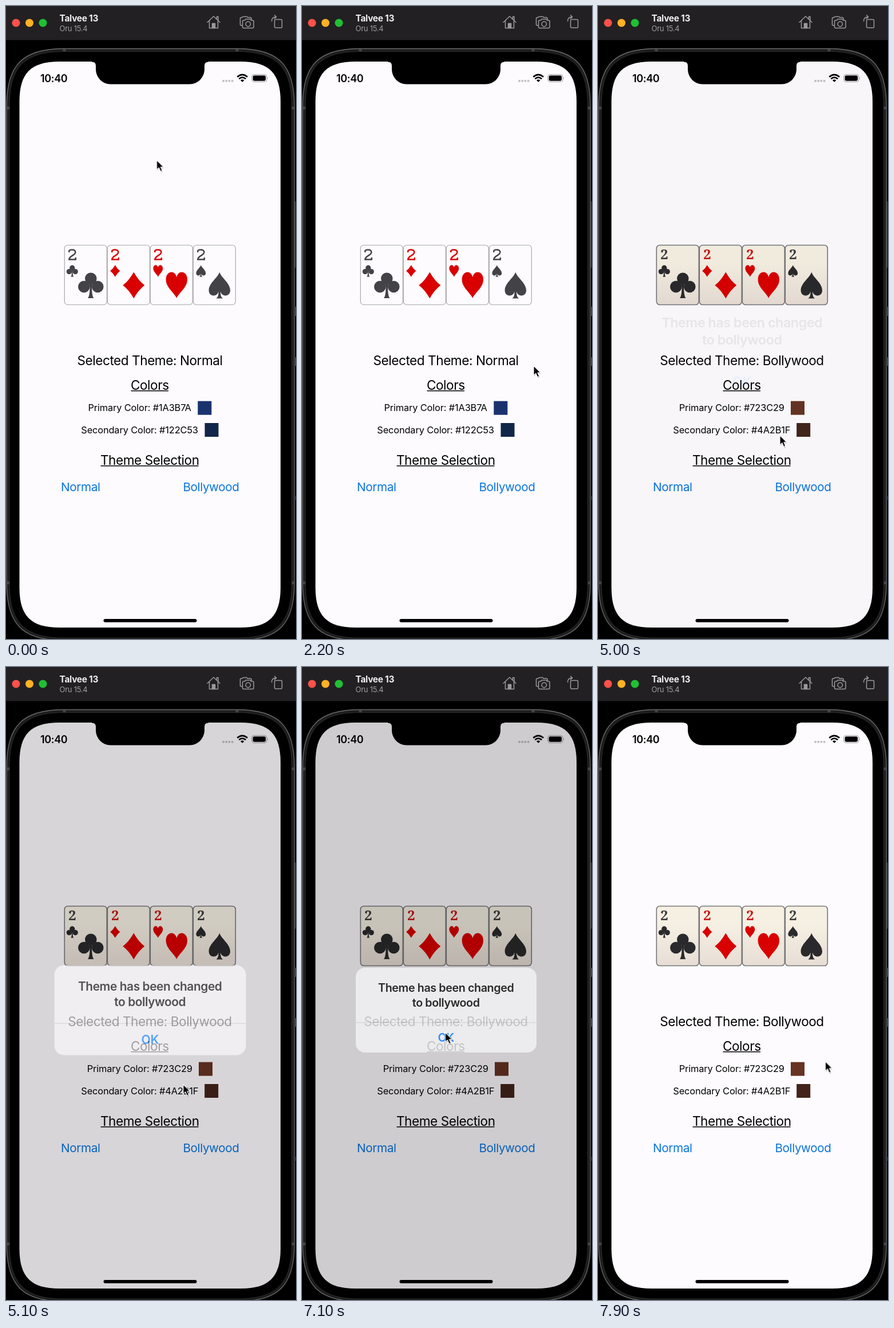
Recreate the animation shown at these times as an HTML page. Size 507 by 1105 pixels, loop 8000 ms.

```html
<!DOCTYPE html>
<html lang="en">
<head>
<meta charset="utf-8">
<title>Card theme switch</title>
<style>
  html, body { margin: 0; width: 100%; height: 100%; overflow: hidden; background: #000; }
  svg { display: block; width: 100vw; height: 100vh; }
  text { font-family: Inter, "Liberation Sans", sans-serif; font-optical-sizing: none; letter-spacing: -.02em; }
  .mid { text-anchor: middle; }
  .big { font-size: 22.6px; }
  .small { font-size: 16.4px; letter-spacing: -.01em; }
  .link { font-size: 20.7px; fill: #0a74e0; }
  .bold { font-weight: 600; }
  .icon { fill: none; stroke: #9b999c; stroke-width: 1.5; stroke-linejoin: round; stroke-linecap: round; }
  .red { fill: #d90000; color: #d90000; }
  .plain .dark { fill: #434246; color: #434246; }
  .film .dark { fill: #2a2a2c; color: #3c3b3d; }
  .film .red { color: #c81818; }
  .film .deuce { font: 600 24px "Noto Serif", serif; text-anchor: middle; fill: currentColor; }

  .plain, .film, .alert, .panel, .plate, .cursor { animation: 8s infinite step-end; }
  .plain { animation-name: plain; }
  .film { animation-name: film; }
  .alert { animation-name: fade; }
  .panel { animation-name: settle; transform-origin: 251.5px 598.5px; }
  .plate { animation-name: plate; }
  .cursor { animation-name: roam; }

  @keyframes plain { 0% { opacity: 1 } 62.5%, 100% { opacity: 0 } }
  @keyframes film { 0% { opacity: 0 } 62.5%, 100% { opacity: 1 } }
  @keyframes plate { 0% { opacity: 0 } 63.75%, 100% { opacity: 1 } }
  @keyframes fade {
    0% { opacity: 0 }
    62.5% { opacity: .09 }
    63.75% { opacity: .68 }
    65% { opacity: 1 }
    88.75% { opacity: .84 }
    90% { opacity: .45 }
    91.25% { opacity: .16 }
    92.5% { opacity: .03 }
    93.75%, 100% { opacity: 0 }
  }
  @keyframes settle {
    0%, 62.5% { transform: scale(1.184) }
    63.75% { transform: scale(1.06) }
    65% { transform: scale(1.012) }
    66.25%, 100% { transform: none }
  }
  /* ten moves a second */
  @keyframes roam {
    0% { transform: translate(263.5px, 269px); animation-timing-function: steps(3) }
    3.75%, 5% { transform: translate(268px, 310px); animation-timing-function: steps(5) }
    11.25% { transform: translate(245px, 640px); animation-timing-function: steps(4) }
    16.25% { transform: translate(262px, 928px); animation-timing-function: steps(4) }
    21.25% { transform: translate(375px, 836px); animation-timing-function: steps(5) }
    27.5% { transform: translate(405px, 628px); animation-timing-function: steps(4) }
    32.5% { transform: translate(396px, 700px); animation-timing-function: steps(5) }
    38.75% { transform: translate(345px, 841px); animation-timing-function: steps(8) }
    48.75%, 55% { transform: translate(342.5px, 843px); animation-timing-function: steps(6) }
    62.5% { transform: translate(318px, 749.5px); animation-timing-function: steps(5) }
    68.75% { transform: translate(277px, 645px); animation-timing-function: steps(5) }
    75% { transform: translate(262px, 631.5px); animation-timing-function: steps(11) }
    88.75%, 91.25% { transform: translate(250.5px, 638px); animation-timing-function: steps(6) }
    98.75%, 100% { transform: translate(397.5px, 688.5px); animation-timing-function: step-end }
  }
</style>
</head>
<body>
<svg viewBox="0 0 507 1105" preserveAspectRatio="none">
  <defs>
    <linearGradient id="paper" x2="0" y2="1">
      <stop offset=".3" stop-color="#f6f0e3"/><stop offset="1" stop-color="#e7ddd5"/>
    </linearGradient>
    <clipPath id="lcd">
      <path d="M93.5 97H410c50 0 70 20 70 70V1015c0 50-20 70-70 70H93.5c-50 0-70-20-70-70V167c0-50 20-70 70-70Z"/>
    </clipPath>

    <g id="clubPip">
      <circle cy="-11.8" r="10.3"/><circle cx="-12" cy="2.5" r="10.3"/><circle cx="12" cy="2.5" r="10.3"/>
      <path d="M-3-6H3L1.800 5C2 14 3 20 5.300 22.600H-5.300C-3 20-2 14-1.800 5Z"/>
    </g>
    <path id="diamondPip" d="M0-23Q8-8.500 19 0Q8 8.500 0 23Q-8 8.500-19 0Q-8-8.500 0-23Z"/>
    <path id="heartPip" d="M0 22.500C-4 13-18.700 4-18.700-10C-18.700-18-14-23-9-23C-4-23-1-19 0-14C1-19 4-23 9-23C14-23 18.700-18 18.700-10C18.700 4 4 13 0 22.500Z"/>
    <path id="spadePip" d="M0-23C3-13 18.700-4 18.700 9C18.700 15 14.500 18 10.500 18C6.500 18 3 15.500 1.500 11C2 18 3 21 6 23H-6C-3 21-2 18-1.500 11C-3 15.500-6.500 18-10.500 18C-14.500 18-18.700 15-18.700 9C-18.700-4-3-13 0-23Z"/>

    <g id="club"><use href="#clubPip" transform="translate(46.5 70.5)"/><use href="#clubPip" transform="translate(14 45.5) scale(.45)"/></g>
    <g id="diamond"><use href="#diamondPip" transform="translate(46.5 70.5)"/><use href="#diamondPip" transform="translate(14 45.5) scale(.45)"/></g>
    <g id="heart"><use href="#heartPip" transform="translate(46.5 70.5)"/><use href="#heartPip" transform="translate(14 45.5) scale(.45)"/></g>
    <g id="spade"><use href="#spadePip" transform="translate(46.5 70.5)"/><use href="#spadePip" transform="translate(14 45.5) scale(.45)"/></g>

    <rect id="card" x=".5" y=".5" width="74" height="104" rx="5.5"/>
    <path id="two" d="M8.500 13V10.500Q9.500 8.500 13.500 8.500Q19.500 8.500 19.500 13C19.500 18 8.500 19.500 8.500 25.500H20V22" fill="none" stroke="currentColor" stroke-width="2.5"/>
  </defs>

  <!-- toolbar -->
  <rect width="507" height="1105"/>
  <rect width="507" height="59.5" fill="#222022"/>
  <circle cx="17.5" cy="29.5" r="7" fill="#ff5149"/>
  <circle cx="41" cy="29.5" r="7" fill="#fdb124"/>
  <circle cx="64.5" cy="29.5" r="7" fill="#20c033"/>
  <text x="93.5" y="27" font-size="15.5" font-weight="700" fill="#f0eff0">Talvee 13</text>
  <text x="93.5" y="43.5" font-size="13" fill="#a09ea1">Oru 15.4</text>
  <g class="icon">
    <path d="M352 28.500L363 18L374 28.500M355.500 26V38.500H370.500V26M368.500 22.500V18.500H371V25"/>
    <path d="M360.500 30.500H365.500V38.500H360.500Z" fill="#9b999c"/>
    <path d="M413 34H411.500Q409.500 34 409.500 32V22Q409.500 20 411.500 20H413L414.500 18.500H421L422.500 20H427Q429 20 429 22V23.500"/>
    <path d="M415.500 25H417.500L419 23H427L428.500 25H431Q433 25 433 27V36.500Q433 38.500 431 38.500H415.500Q413.500 38.500 413.500 36.500V27Q413.500 25 415.500 25Z"/>
    <circle cx="423.3" cy="31.5" r="4.2"/>
    <rect x="469.5" y="23.5" width="13" height="14.5" rx="2"/>
    <path d="M464.500 26.500Q464.500 19 472.500 19M469.500 16L472.700 19L469.500 22"/>
  </g>

  <!-- phone body -->
  <rect x="503" y="341" width="3.5" height="116" rx="1" fill="#343435"/>
  <path d="M506.500 525V541M506.500 613V628" stroke="#777"/>
  <path d="M506.500 855V862" stroke="#8b1f1f"/>
  <path d="M101.200 74.500H404.200c72 0 100 28 100 100V1007.500c0 72-28 100-100 100H101.200c-72 0-100-28-100-100V174.500c0-72 28-100 100-100Z" fill="#1d1d1e" stroke="#6c6c6e" stroke-width="1.3"/>
  <path d="M101 79.500H404.500c68.500 0 95 26.500 95 95V1008c0 68.500-26.500 95-95 95H101c-68.500 0-95-26.500-95-95V174.500c0-68.500 26.500-95 95-95Z" stroke="#2d2d2e"/>
  <path d="M102 75V79M404 75V79M2 178H6M500 178H504M2 1007H6M500 1007H504" stroke="#454547" stroke-width="5"/>

  <g clip-path="url(#lcd)">
    <rect x="23" y="97" width="458" height="989" fill="#fdfbfe"/>

    <!-- status bar -->
    <text class="bold" x="60" y="132.7" font-size="18">10:40</text>
    <path d="M380 130.700h.1M385.200 130.700h.1M390.400 130.700h.1M395.600 130.700h.1" stroke="#c2c1c5" stroke-width="4" stroke-linecap="round"/>
    <g fill="none" stroke="#000" stroke-width="2.7">
      <path d="M404.300 123.800Q413.200 115.800 422.100 123.800M407.300 127.200Q413.200 122 419.100 127.200"/>
      <path d="M410 129.700Q413.200 126.700 416.400 129.700L413.200 132.800Z" fill="#000" stroke="none"/>
    </g>
    <rect x="429.8" y="119.5" width="26" height="13" rx="4" fill="none" stroke="#a3a2a5" stroke-width="1.2"/>
    <rect x="431.6" y="121.3" width="22.4" height="9.4" rx="2.4"/>
    <path d="M457 124Q459 126 457 128.200Z" fill="#a3a2a5"/>

    <g class="plain">
      <g transform="translate(101.8 417)">
        <g fill="#fdfbfe" stroke="#a9a9ab" stroke-width="1.2">
          <use href="#card"/><use href="#card" x="75"/><use href="#card" x="150"/><use href="#card" x="225"/>
        </g>
        <g class="dark"><use href="#club"/><use href="#two"/><use href="#spade" x="225"/><use href="#two" x="225"/></g>
        <g class="red"><use href="#diamond" x="75"/><use href="#two" x="75"/><use href="#heart" x="150"/><use href="#two" x="150"/></g>
      </g>
      <text class="big mid" x="251.5" y="626.5">Selected Theme: Normal</text>
      <text class="small mid" x="233.6" y="707">Primary Color: #1A3B7A</text>
      <text class="small mid" x="233.6" y="745.5">Secondary Color: #122C53</text>
      <rect x="335.3" y="689.7" width="24" height="24" fill="#1a326e"/>
      <rect x="347.5" y="728" width="24" height="24" fill="#112648"/>
    </g>

    <g class="film">
      <g transform="translate(101.8 417)">
        <g fill="url(#paper)" stroke="#75757a" stroke-width="1.6">
          <use href="#card"/><use href="#card" x="75"/><use href="#card" x="150"/><use href="#card" x="225"/>
        </g>
        <g class="dark">
          <use href="#club"/><use href="#spade" x="225"/>
          <text class="deuce" x="14" y="25">2</text><text class="deuce" x="239" y="25">2</text>
        </g>
        <g class="red">
          <use href="#diamond" x="75"/><use href="#heart" x="150"/>
          <text class="deuce" x="89" y="25">2</text><text class="deuce" x="164" y="25">2</text>
        </g>
      </g>
      <text class="big mid" x="251.5" y="626.5">Selected Theme: Bollywood</text>
      <text class="small mid" x="233.8" y="707">Primary Color: #723C29</text>
      <text class="small mid" x="233.8" y="745.5">Secondary Color: #4A2B1F</text>
      <rect x="337" y="689.7" width="24" height="24" fill="#673323"/>
      <rect x="347.2" y="728" width="24" height="24" fill="#42241a"/>
    </g>

    <g class="mid">
      <text class="big" x="251.3" y="669.5">Colors</text>
      <text class="big" x="251.3" y="800.5">Theme Selection</text>
      <text class="link" x="130.3" y="847">Normal</text>
      <text class="link" x="358.5" y="847">Bollywood</text>
    </g>
    <path d="M218.500 671.700H284M165.500 802.700H336.500" stroke="#000" stroke-width="1.4"/>

    <g class="alert">
      <rect x="23" y="97" width="458" height="989" fill-opacity=".22"/>
      <g class="panel">
        <rect class="plate" x="94" y="525" width="316" height="148" rx="16" fill="#e9e8ea"/>
        <path d="M94 620.800H410" stroke="#c4c3c6" stroke-width="1.1"/>
        <g class="mid bold" font-size="19.7">
          <text x="251.7" y="567">Theme has been changed</text>
          <text x="251.7" y="592.5">to bollywood</text>
          <text x="251.7" y="654.3" font-size="20" fill="#0a7af5">OK</text>
        </g>
      </g>
    </g>

    <!-- home bar -->
    <rect x="170.5" y="1070" width="163" height="5.7" rx="2.85"/>
  </g>

  <!-- notch -->
  <path d="M150 96H354V97.500Q347 97.500 347 104V110c0 14.600-11.400 26.500-26 26.500H183c-14.600 0-26-11.900-26-26.500V104Q157 97.500 150 97.500Z"/>

  <g class="cursor">
    <path d="M.5 1.500V19L4.500 15.300L7.500 22L10.500 20.500L7.700 14.300H13Z" fill-opacity=".18"/>
    <path d="M0 0V16.800L3.900 13.200L6.700 19.700L9.700 18.400L6.900 12.100H12Z" stroke="#fff" stroke-width="1.1" stroke-linejoin="round"/>
  </g>
</svg>
</body>
</html>
```
